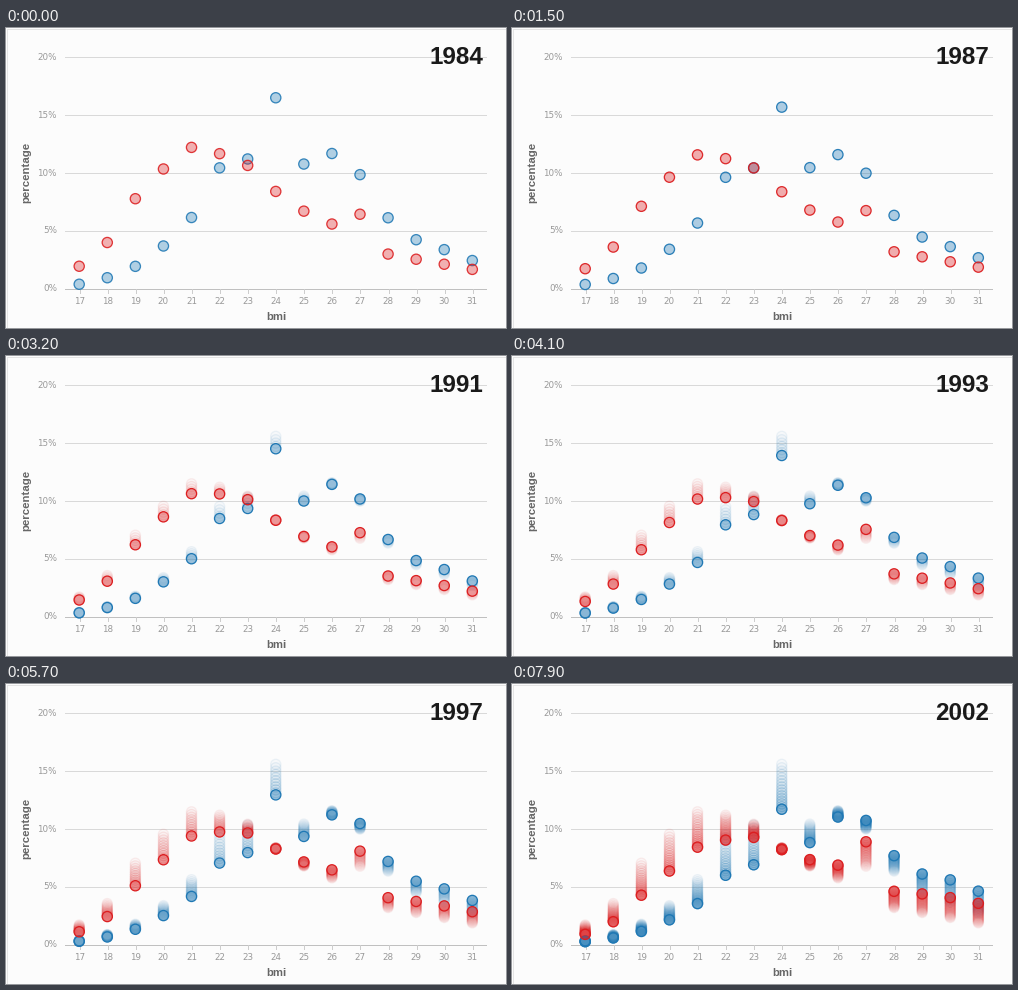
Write a matplotlib script that moves like this. It is 500 by 300 pixels and loops after 8000 ms.

```python
import numpy as np
import matplotlib.pyplot as plt
from matplotlib.animation import FuncAnimation
from matplotlib.colors import to_rgb
from matplotlib.patches import Rectangle

W, H, DPI = 500, 300, 100
PX = 72 / DPI
FRAMES, INTERVAL = 80, 100
HOLD, YEARS_PER_FRAME = 4, 0.24
FIRST_YEAR, FIRST_GHOST, MID_YEAR = 1984, 1987, 1995
BASE_Y, PX_PER_PERCENT = 259.5, 11.55

BMI = np.arange(17, 32)
BMI_X = 73.2 + 28.08 * (BMI - 17)

# Shape of each distribution in the middle year, in percent.
BLUE_MID = np.array([.2, .6, 1.3, 2.55, 4.3, 7.35, 8.25, 13.3,
                     9.45, 11.2, 10.3, 6.95, 5.2, 4.5, 3.5])
RED_MID = np.array([1.1, 2.5, 5.3, 7.6, 9.65, 9.9, 9.7, 8.2,
                    7, 6.25, 7.75, 3.8, 3.45, 3.05, 2.55])
BLUE, RED = to_rgb("#1f78b4"), to_rgb("#dc1e20")


def percent_y(percent):
    return BASE_Y - PX_PER_PERCENT * percent


def blue_percent(year):
    return BLUE_MID * np.exp(0.008 * (np.maximum(BMI, 22.5) - 26.4) * (year - MID_YEAR))


def red_percent(year):
    return RED_MID * np.exp(0.0065 * (BMI - 24.2) * (year - MID_YEAR))


def label(x, y, text, px, color, **style):
    style = {"ha": "center", "va": "baseline", "family": "DejaVu Sans", **style}
    return ax.text(x, y, text, fontsize=px * PX, color=color, **style)


fig = plt.figure(figsize=(W / DPI, H / DPI), dpi=DPI, facecolor="#fcfcfc")
ax = fig.add_axes([0, 0, 1, 1])
ax.set(xlim=(0, W), ylim=(H, 0))
ax.axis("off")

crisp = {"lw": PX, "antialiased": False, "zorder": 1}
ax.add_patch(Rectangle((0.5, 0.5), W - 1, H - 1, fill=False, ec="#e4e4e4", **crisp))
for step in range(5):
    y = 260.5 - 58 * step
    ax.hlines(y, 59, 480, color="#d9d9d9" if step else "#c0c0c0", **crisp)
    label(51, percent_y(5 * step) + 3.5, f"{5 * step}%", 8.8, "#999999", ha="right")
for bmi, x in zip(BMI, BMI_X):
    ax.vlines(int(x) + 0.5, 261, 265, color="#cdcdcd", **crisp)
    label(x, 276, str(bmi), 8.8, "#999999")

title = {"family": "Liberation Sans", "weight": "bold"}
label(270, 292, "bmi", 11.4, "#666666", **title)
label(20.5, 144, "percentage", 11.4, "#666666", rotation=90, va="center", **title)
year_text = label(450.5, 36, "", 24.3, "#1a1a1a", **title)

dots = ax.scatter([], [], s=(10.2 * PX) ** 2, linewidths=1.3 * PX, zorder=2)


def update(frame):
    year = FIRST_YEAR + YEARS_PER_FRAME * max(0, frame - HOLD)
    points, fills, edges = [], [], []

    def add_year(when, fill, edge):
        for percent, color in ((blue_percent, BLUE), (red_percent, RED)):
            points.extend(zip(BMI_X, percent_y(percent(when))))
            fills.extend([(*color, fill)] * len(BMI))
            edges.extend([(*color, edge)] * len(BMI))

    for past in range(FIRST_GHOST, int(year) + 1):
        strength = 0.07 + 0.014 * (past - FIRST_GHOST)
        add_year(past, 0.35 * strength, strength)
    age = year - FIRST_YEAR
    add_year(year, 0.34 + 0.006 * age, min(1, 0.88 + 0.02 * age))

    dots.set_offsets(points)
    dots.set_facecolors(fills)
    dots.set_edgecolors(edges)
    year_text.set_text(str(round(year)))
    return dots, year_text


anim = FuncAnimation(fig, update, frames=FRAMES, interval=INTERVAL,
                     repeat=True, repeat_delay=0)
plt.show()
```
